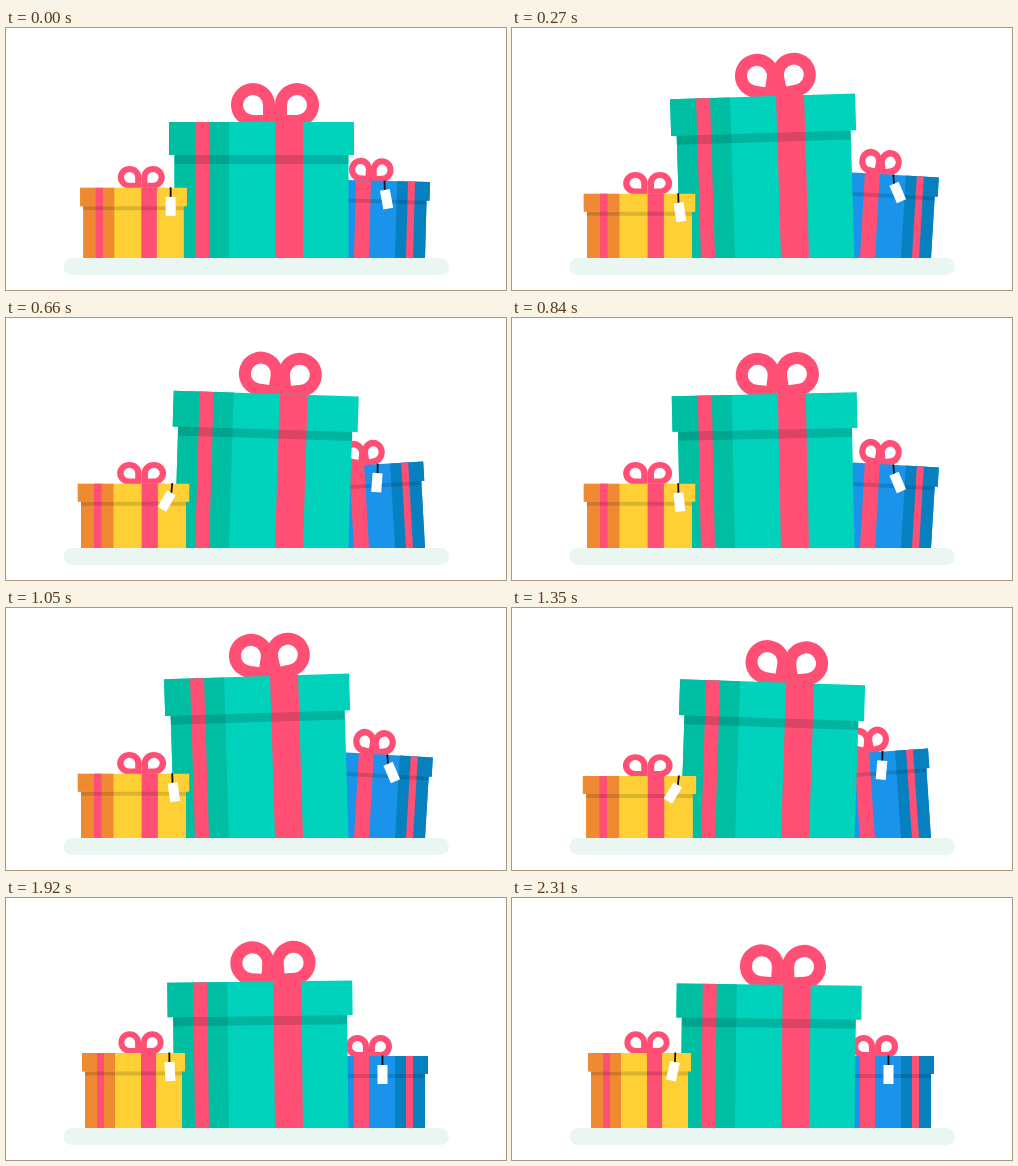
Animation, 500 px wide and 262 px high, one loop 2340 ms. Source, as an HTML page with a canvas:

```html
<!DOCTYPE html>
<html lang="en">
<head>
<meta charset="utf-8">
<title>Bouncing gifts</title>
<style>
  html, body { margin: 0; width: 100%; height: 100%; overflow: hidden; background: #fff; }
  canvas { display: block; }
</style>
</head>
<body>
<canvas id="stage" width="500" height="262"></canvas>
<script>
const ctx = document.getElementById('stage').getContext('2d');
const FLOOR = 230, HOP = 390, STEP = 30;
const PINK = '#ff4f75';

// dir -1 mirrors a box; x values are offsets from its centre
const GREEN = {
  cx: 255.5, dir: 1, main: '#00d2bb', shade: '#00bea2',
  body: 87, lid: 92.5, shadeEnd: -32.5, thin: [-66.5, -52.5], wide: [13.5, 41.5],
  bow: { x: 13.5, r: 22, hole: 10, lift: 17 }, band: 9
};
const SMALL = {
  body: 48.5, lid: 51.5, shadeEnd: -18.5, thin: [-36.5, -29.5], wide: [7.5, 22.5], band: 4
};
const YELLOW = {
  ...SMALL, cx: 127.5, dir: 1, main: '#ffd035', shade: '#f08a32',
  bow: { x: 7.5, r: 11.3, hole: 5.4, lift: 10.5 }, tagX: 35.8
};
const BLUE = {
  ...SMALL, cx: 370.5, dir: -1, main: '#1a94ea', shade: '#0780bf',
  bow: { x: 7.5, r: 11.5, hole: 5.4, lift: 9.5 }, tagX: -6
};

// Height of a hop (0..1) and which of the two alternating hops is running
function hop(t) {
  const n = Math.floor(t / HOP);
  const u = t / HOP - n;
  return { c: 1 - Math.abs(2 * u - 1) ** 2.8, first: n % 2 === 0 };
}

function teardrop(x, y, r) {
  ctx.moveTo(x - r, y + r);
  ctx.lineTo(x - r, y);
  ctx.arc(x, y, r, Math.PI, Math.PI * 2.5);
  ctx.closePath();
}

function drawBow({ r, hole, lift }, [x, y], tilt, lean, sx, sy) {
  ctx.fillStyle = PINK;
  for (const side of [-1, 1]) {
    ctx.save();
    ctx.translate(x, y);
    ctx.rotate(tilt);
    ctx.scale(side * sx, sy);
    ctx.rotate(-lean);
    ctx.beginPath();
    teardrop(r, -lift, r);
    teardrop(r, -lift, hole);
    ctx.fill('evenodd');
    ctx.restore();
  }
}

function drawTag([x, y], angle) {
  ctx.save();
  ctx.translate(x, y);
  ctx.rotate(angle * 0.2);
  ctx.fillStyle = '#111';
  ctx.fillRect(-0.9, -0.5, 1.8, 10.5);
  ctx.translate(0, 9);
  ctx.rotate(angle * 0.8);
  ctx.fillStyle = '#fff';
  ctx.fillRect(-5, 0, 10, 19);
  ctx.restore();
}

function drawBox(box, { bodyH, lidH, tilt = 0, sx = 1, lean = 0, bowY = 1, swing = 0 }) {
  const { cx, dir } = box;
  const top = bodyH + lidH;
  const point = (dx, h) => {
    const x = dx * sx * dir;
    return [cx + x + tilt * h, FLOOR - h + (h ? tilt * x : 0)];
  };
  const slab = (x0, x1, h0, h1, color) => {
    ctx.fillStyle = color;
    ctx.beginPath();
    for (const [x, h] of [[x0, h0], [x1, h0], [x1, h1], [x0, h1]]) ctx.lineTo(...point(x, h));
    ctx.fill();
  };

  drawBow(box.bow, point(box.bow.x, top), tilt, lean, sx, bowY);
  slab(-box.body, box.body, 0, bodyH + 1, box.main);
  slab(-box.body, box.shadeEnd, 0, bodyH + 1, box.shade);
  slab(-box.lid, box.lid, bodyH, top, box.main);
  slab(-box.lid, box.shadeEnd, bodyH, top, box.shade);
  slab(...box.thin, 0, top, PINK);
  slab(...box.wide, 0, top, PINK);
  slab(-box.body, box.body, bodyH - box.band, bodyH, 'rgba(0,0,0,.14)');
  if (box.tagX !== undefined) drawTag(point(box.tagX, top), swing * Math.PI / 180);
}

function draw(t) {
  ctx.fillStyle = '#fff';
  ctx.fillRect(0, 0, 500, 262);

  const big = hop(t);
  const late = hop(t + STEP);
  const stretch = big.c * (big.first ? 1 : 0.72);

  drawBox(BLUE, {
    bodyH: 54 + 12.5 * late.c,
    lidH: 18 + 1.5 * late.c,
    tilt: (late.first ? 0.07 : -0.07) * late.c,
    lean: 0.2 * late.c,
    bowY: 1 + 0.1 * late.c,
    swing: (late.first ? -28 : 5) * late.c
  });
  drawBox(GREEN, {
    bodyH: 103 + 23.5 * stretch,
    lidH: 33 + 4 * stretch,
    tilt: (big.first ? -0.033 : 0.033) * big.c,
    lean: 0.2 * stretch
  });
  drawBox(YELLOW, {
    bodyH: 56.5 - 12.5 * late.c,
    lidH: 18.5 - 0.5 * late.c,
    sx: 1 + 0.1 * late.c,
    swing: (big.first ? -9 : 32) * big.c
  });

  ctx.fillStyle = '#eaf6f1';
  ctx.beginPath();
  ctx.roundRect(57.5, FLOOR, 385.5, 17, 8.5);
  ctx.fill();
}

const start = performance.now();
function tick() {
  const elapsed = (performance.now() - start) % 2340;
  draw(Math.floor(elapsed / STEP) * STEP);
  requestAnimationFrame(tick);
}
tick();
</script>
</body>
</html>
```
